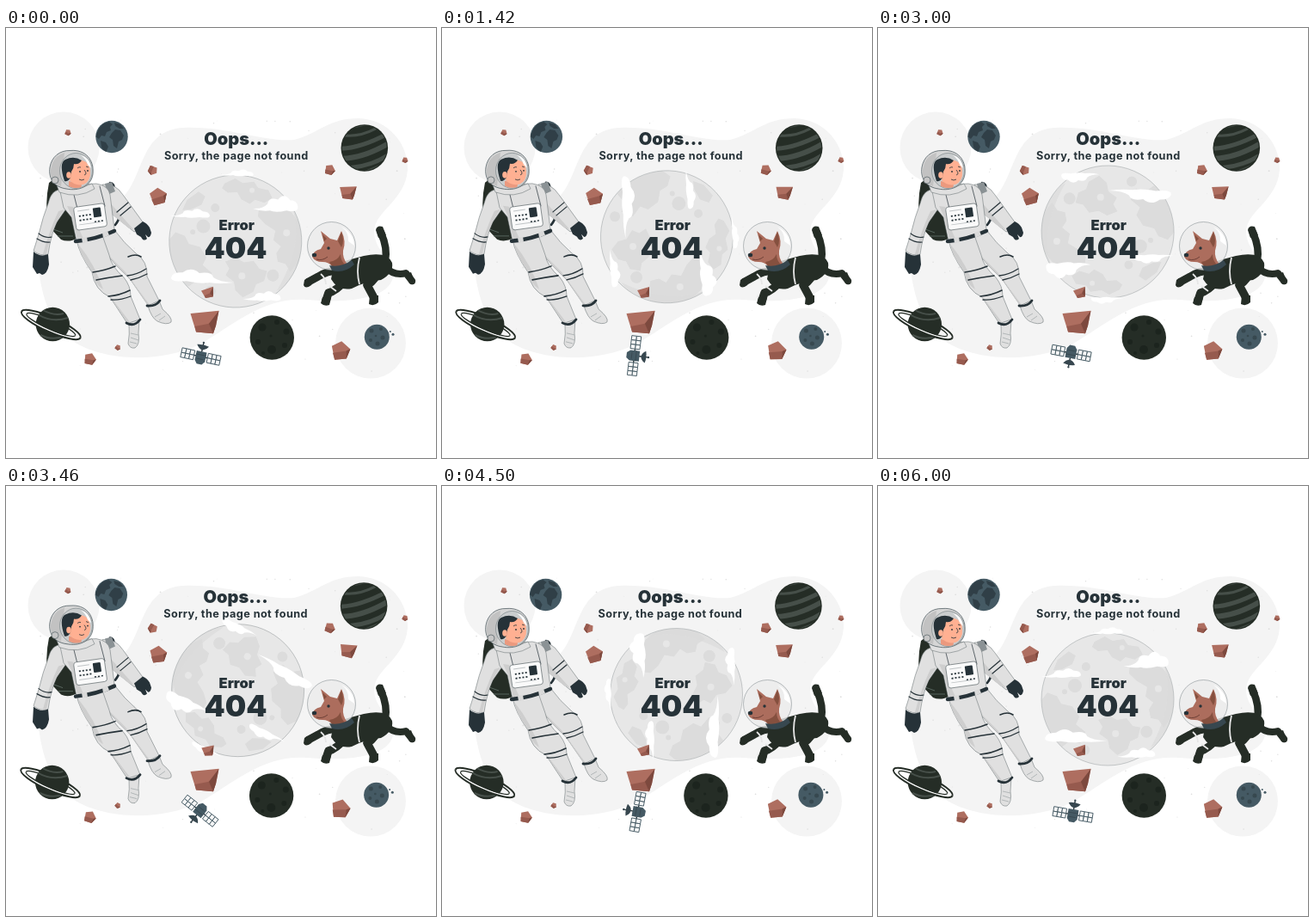
These frames come from a looping animation (500 px wide and 500 px high, 6.04 s). An HTML page:

```html
<!DOCTYPE html>
<html lang="en">
<head>
<meta charset="utf-8">
<title>Page not found</title>
<style>
html, body { margin: 0; width: 100%; height: 100%; overflow: hidden; background: #fff; }
svg { display: block; width: 100vw; height: 100vh; }
text { font-family: Inter, "Open Sans", sans-serif; fill: #263238; text-anchor: middle; }
.ink { fill: #263238; }
.dark { fill: #252d26; }
.suit { fill: #e0e0e0; stroke: #5d6669; stroke-width: .5; stroke-linejoin: round; }
.shade { fill: #cecece; }
.line { fill: none; stroke: #263238; stroke-linecap: round; stroke-linejoin: round; }
.dogline { fill: none; stroke: #252d26; stroke-linecap: round; stroke-linejoin: round; }
</style>
</head>
<body>
<svg viewBox="0 0 500 500">
  <defs>
    <clipPath id="moonClip"><circle cx="267" cy="248" r="76.6"/></clipPath>
    <clipPath id="stripeClip"><circle cx="416.8" cy="139.5" r="26"/></clipPath>
    <clipPath id="ringClip"><circle cx="54.3" cy="344.5" r="19.5"/></clipPath>
    <clipPath id="earthClip"><circle cx="123" cy="126.5" r="18.5"/></clipPath>
    <clipPath id="visorClip"><ellipse cx="81.500" cy="166" rx="18.500" ry="20"/></clipPath>
  </defs>

  <g fill="#f4f4f4">
    <path d="M36 258C34 210 90 222 126 204C162 186 150 120 205 116C255 113 300 133 335 130C365 122 375 105 410 105C445 106 468 135 467 165C464 202 428 212 428 238C430 262 452 270 450 290C444 316 395 320 350 316C300 312 265 345 225 368C180 390 110 388 75 362C45 338 38 295 36 258Z"/>
    <circle cx="67" cy="139" r="41.500"/>
    <circle cx="424" cy="366.500" r="41"/>
  </g>
  <g id="stars" fill="#dedede"></g>

  <g id="moon">
    <circle cx="267" cy="248" r="77" fill="#e7e7e7"/>
    <g clip-path="url(#moonClip)" fill="#dcdcdc">
      <path d="M252 181l12-6 9 5 13-2 5 7 12 2 5 9-9 6-11-3-6 5-10-5-5-8-11 1-7-5Z"/>
      <path d="M293 208l14 2 8-6 16 8 16 20-1 32-14 17-6-9-9-2-2-10 5-8-9-7 2-11-12-7-9-9Z"/>
      <path d="M189 250l8-10 11 4 5 9 13 3 8 12-4 9 11 9-6 13-12-3-9 7-17-14-9-21Z"/>
      <path d="M256 272l12-5 10 5 11-2 7 9 9 2-3 12-9 4-3 9-12 7-9-8-2-10-10-7 4-8Z"/>
      <path d="M209 202l13-10 8 5-4 10-12 6-10 1Z"/>
      <circle cx="229" cy="232" r="8"/><circle cx="217" cy="239" r="3"/><circle cx="242" cy="210" r="5"/>
      <circle cx="312" cy="286" r="7"/><circle cx="240" cy="307" r="6"/>
      <g fill="#e7e7e7"><circle cx="284" cy="188" r="3"/><circle cx="326" cy="236" r="4"/><circle cx="276" cy="288" r="4"/></g>
      <path d="M331 205Q348 248 317 304Q327 299 339 279Q352 239 331 205Z" opacity=".7"/>
    </g>
    <circle cx="267" cy="248" r="77" fill="none" stroke="#959b9d" stroke-width=".5"/>
    <g id="clouds" fill="#fff"></g>
  </g>

  <text x="268.300" y="235" font-size="16.500" font-weight="900">Error</text>
  <text x="267" y="267.800" font-size="34.500" font-weight="900">404</text>

  <g class="drift">
    <text x="267.800" y="135.500" font-size="20" font-weight="900">Oops...</text>
    <text x="267.800" y="153" font-size="12.700" font-weight="700" letter-spacing=".4">Sorry, the page not found</text>
  </g>

  <g class="drift">
    <circle cx="123" cy="126.500" r="18.700" fill="#455a64"/>
    <g clip-path="url(#earthClip)" fill="#263238" opacity=".65">
      <path d="M108 117l5-6 7-2 4 3-3 3 1 4-5 2-2 5-4-1-3 4-4-3ZM123 122l4-4 6 1 4 6-2 5-4 2-2 8-4-3-1-7-4-3ZM126 110l7 2 4 5-5 0-5-3ZM110 131l6 2 3 5-3 7-5-6Z"/>
    </g>

    <circle cx="416.800" cy="139.500" r="27.300" class="dark"/>
    <g clip-path="url(#stripeClip)" fill="none" stroke="#464f49" stroke-linecap="round">
      <g transform="rotate(-14 416.800 139.500)">
        <path d="M396 119Q414 126 434 121" stroke-width="3"/>
        <path d="M387 133Q411 139 447 130" stroke-width="5"/>
        <path d="M388 145Q412 151 446 141" stroke-width="6"/>
        <path d="M397 158Q421 162 445 153" stroke-width="5"/>
        <path d="M405 113L431 114M410 166L434 163" stroke-width="1.500"/>
      </g>
    </g>

    <circle cx="309.300" cy="360" r="25.700" class="dark"/>
    <g fill="#1c241e">
      <circle cx="298" cy="348" r="4.500"/><circle cx="315" cy="342" r="3"/><circle cx="326" cy="353" r="3.500"/>
      <circle cx="293" cy="365" r="3"/><circle cx="309" cy="374" r="5"/><circle cx="324" cy="369" r="3"/>
      <circle cx="308" cy="358" r="1.500"/><circle cx="299" cy="378" r="2"/>
    </g>

    <g transform="translate(52.300 345) rotate(24)" fill="none" stroke="#252d26">
      <path d="M-37.500 0A37.500 8.500 0 0 1 37.500 0" stroke-width="2"/>
      <path d="M-31 0A31 5.500 0 0 1 31 0" stroke-width="1.300"/>
    </g>
    <circle cx="54.300" cy="344.500" r="19.700" class="dark"/>
    <g clip-path="url(#ringClip)" fill="none" stroke="#464f49" stroke-width="2">
      <path d="M37 333Q53 343 72 337M43 328Q55 335 67 332M40 357Q54 364 70 358"/>
    </g>
    <g transform="translate(52.300 345) rotate(24)" fill="none">
      <path d="M-34 0A34 7 0 0 0 34 0" stroke="#fff" stroke-width="2.200"/>
      <path d="M-37.500 0A37.500 8.500 0 0 0 37.500 0" stroke="#252d26" stroke-width="2"/>
      <path d="M-31 0A31 5.500 0 0 0 31 0" stroke="#252d26" stroke-width="1.300"/>
    </g>

    <circle cx="431.300" cy="359.300" r="14.500" fill="#455a64"/>
    <g fill="#37484f">
      <circle cx="425" cy="352" r="2.500"/><circle cx="436" cy="350" r="2"/><circle cx="438" cy="360" r="2.500"/>
      <circle cx="424" cy="363" r="2"/><circle cx="432" cy="367" r="2.500"/><circle cx="430" cy="358" r="1.300"/>
    </g>
    <g fill="#455a64"><circle cx="446.800" cy="353" r="1"/><circle cx="450" cy="356.300" r="1.500"/></g>
  </g>

  <g id="rocks"></g>

  <g id="probe">
    <g transform="translate(226.500 382) rotate(10)">
      <path class="line" d="M-8 0H8M0 -6V-15" stroke-width="1.400"/>
      <g id="panels" fill="#f8f8f8" stroke="#455a64" stroke-width=".9"></g>
      <path d="M-6 -6H6V5L3 9H-3L-6 5Z" fill="#455a64"/>
      <path d="M-6 -2H6M-4 3H4" stroke="#37474f" stroke-width=".8"/>
      <path d="M-7 -13Q0 -15 7 -13Q4 -8 0 -8Q-4 -8 -7 -13Z" fill="#37474f"/>
      <circle cy="-16.500" r="1.200" fill="#37474f"/>
    </g>
  </g>

  <g id="astronaut">
    <path class="dark" d="M50 180Q60 171 76 176L84 244Q73 250 64 246L49 230Q45 203 50 180Z"/>
    <path d="M52 233L66 238M60 242L78 242" stroke="#56645d" fill="none"/>
    <path class="line" d="M121 180Q126 180 126 190L129 207Q136 218 127 229" stroke-width="2.600"/>
    <path class="suit" d="M112 182Q127 180 136 194L160 227Q159 236 149 237L118 212Z"/>
    <path class="shade" d="M119 201L148 234L143 233L119 213Z"/>
    <path d="M115 181L123 179L127 190L118 194Z" fill="#8b9295"/>
    <path class="line" d="M129 214L142 203M133 218L145 208" stroke-width="1.200"/>
    <path class="ink" d="M149 233L159 225Q164 227 167 232L169 238Q168 244 165 243L162 240L164 245Q160 249 157 243L152 240Z"/>

    <path class="suit" d="M106 240L127 236Q137 250 151 262Q165 271 164 289L178 317Q174 324 165 322L145 293L128 276L116 262Z"/>
    <path class="shade" d="M117 262L139 284L167 322L164 321L145 293L128 276Z"/>
    <path class="suit" d="M82 246L112 241L120 264Q122 277 137 290Q145 300 145 312L156 339Q149 347 140 342L121 313Q103 305 100 284Q85 263 82 246Z"/>
    <path class="shade" d="M84 251Q104 276 113 304Q103 298 100 283Q86 265 84 251ZM122 313L144 342L141 342L121 313Z"/>
    <path class="line" d="M101 284Q115 282 127 277M105 293Q120 290 135 288M119 312Q132 311 144 305M142 266Q151 262 157 266" stroke-width="1.600"/>
    <path class="line" d="M122 316Q132 317 145 312M141 288Q152 287 163 280M145 293Q155 291 164 286" stroke-width="1.300"/>
    <path class="suit" d="M143 343L155 339L154 355Q156 368 150 372Q144 373 142 367Q144 357 143 343Z"/>
    <path class="suit" d="M165 323L178 317L182 327Q194 337 192 342Q187 346 176 341Q169 337 165 323Z"/>
    <path class="line" d="M140 343Q149 348 156 339M164 323Q174 324 179 317" stroke-width="2.800"/>
    <path d="M144 365L152 367M145 360L154 363M145 355L154 357M173 336L180 332M178 340L185 335" stroke="#a6acae" stroke-width=".8"/>

    <path class="suit" d="M67 188Q53 186 49 204Q43 219 38 240L32 259Q40 266 49 263Q52 241 59 226L73 206Z"/>
    <path class="shade" d="M68 211Q53 231 47 263L43 263Q50 236 61 213Z"/>
    <path class="line" d="M38 239Q46 245 53 243M36 245Q44 250 51 249" stroke-width="1.200"/>
    <path class="ink" d="M32 260Q40 267 49 263L50 275Q48 286 42 287L39 285L36 286L31 278Z"/>

    <path class="suit" d="M63 190Q82 181 105 181Q119 183 121 194L126 234Q105 247 82 248L76 220L67 209Z"/>
    <path class="shade" d="M71 207L77 220L83 246L90 245Q81 227 78 208Z"/>
    <path class="line" d="M81 248Q104 246 126 236" stroke-width="4.500"/>
    <path d="M88 244L94 243L95 249L89 250ZM112 238L118 236L120 241L113 244Z" fill="#d9d9d9"/>
    <path class="line" d="M78 190L85 218M109 184L115 207" stroke-width=".7"/>

    <g transform="translate(98 219) rotate(-8)">
      <rect x="-18" y="-13" width="36" height="27" rx="3" fill="#fafafa" stroke="#4b5659" stroke-width=".6"/>
      <rect x="4" y="-9" width="9" height="11" rx="1" class="ink"/>
      <path d="M-14 -8H0M-14 8H11" stroke="#c0c4c6"/>
      <path d="M-13 -2H1M-13 3H1" stroke="#263238" stroke-width="1.800" stroke-dasharray="2 2"/>
      <path d="M4 7H14" stroke="#263238" stroke-width="1.500" stroke-dasharray="2 2"/>
    </g>

    <path class="suit" d="M59 183Q76 192 100 181L103 187Q84 199 62 191Z"/>
    <path d="M75 142.500C92 141 103 153 101 170C99 184 85 190 70 187C56 185 49 175 51 162C53 150 62 142 75 142.500Z" fill="#d6d6d6" stroke="#435157" stroke-width=".7"/>
    <path d="M54 157Q58 148 68 145L64 184Q51 180 52 165Z" fill="#c2c2c2"/>
    <ellipse cx="81.500" cy="166" rx="19" ry="20.500" fill="#c9cccd" stroke="#7f888b" stroke-width=".7"/>
    <g clip-path="url(#visorClip)">
      <path d="M73 178L88 181L87 190H73Z" fill="#eb997e"/>
      <path d="M73 160Q79 152 89 154Q97 156 98 166Q99 178 90 182Q80 184 74 177Z" fill="#ffb092"/>
      <path class="ink" d="M68 178Q61 157 69 153Q79 148 88 154Q85 159 79 158Q79 163 76 167L75 174Q72 179 68 178Z"/>
      <ellipse cx="73" cy="171" rx="2.800" ry="3.800" fill="#ffb092"/>
      <path d="M83 163Q85 161 87 162M93 161L96 162M91 165Q95 170 91 171M85 176Q88 178 91 176" fill="none" stroke="#263238" stroke-width=".8"/>
      <circle cx="86" cy="167" r=".9" class="ink"/><circle cx="95" cy="166" r=".9" class="ink"/>
    </g>
    <path d="M87 148Q97 150 99 163L95 159Q93 152 87 148Z" fill="#fff"/>
    <circle cx="57" cy="177" r="4" fill="#c6c6c6" stroke="#435157" stroke-width=".6"/>
  </g>

  <g id="dog">
    <path class="dogline" d="M441 271Q444 256 436 238" stroke-width="8.500"/>
    <path class="dark" d="M430 235Q431 229 438 231L442 241L433 244Z"/>
    <path class="dogline" d="M439 277Q452 289 465 285L472 294" stroke-width="8"/>
    <path class="dogline" d="M433 281Q430 293 420 299L428 314" stroke-width="9.500"/>
    <path class="dark" d="M423 311L433 311L433 319Q428 324 422 321ZM465 286L471 284L476 296Q474 300 469 297Z"/>
    <path class="dogline" d="M394 283Q377 280 363 289L352 295" stroke-width="9"/>
    <path class="dogline" d="M396 292Q384 306 375 308L372 317" stroke-width="9.500"/>
    <path class="dark" d="M347 293Q351 289 358 292L355 299Q348 304 346 299ZM368 313L378 314L376 322Q370 324 366 320Z"/>
    <path class="dark" d="M381 276Q398 269 416 265Q443 259 449 273Q451 285 436 293Q419 294 402 303Q386 306 378 292Z"/>
    <path d="M411 267Q407 283 411 298M366 286Q372 291 372 298M376 300L384 306" fill="none" stroke="#e6e6e6" stroke-width="1.800"/>
    <circle cx="378.500" cy="253.500" r="28" fill="#ececec" fill-opacity=".8" stroke="#8a9295" stroke-width=".6"/>
    <path d="M370 250L366 236L377 245L385 247L390 236Q396 248 392 259Q391 267 397 275Q388 283 379 277Q375 272 368 272Q359 272 356 266Q357 259 366 257Z" fill="#ac6d5d"/>
    <path d="M386 248L390 237Q394 248 390 255ZM376 272Q385 271 389 263Q389 271 395 276Q386 281 379 277Z" fill="#85503f"/>
    <path d="M368 240L373 245L370 248Z" fill="#85503f"/>
    <ellipse cx="358.500" cy="264" rx="2.700" ry="2.200" class="ink"/>
    <circle cx="375" cy="256" r="1.700" class="ink"/>
    <path d="M361 269Q368 271 374 266" fill="none" stroke="#60372f" stroke-width=".8"/>
    <path d="M376 276Q389 279 402 270L405 275Q393 286 379 282Z" fill="#37474f"/>
    <path d="M390 231Q404 238 405 253L398 248Q399 238 390 231Z" fill="#fff"/>
  </g>
</svg>
<script>
const LOOP = 6040;
const $ = id => document.getElementById(id);
const fill = (id, parts) => { $(id).innerHTML = parts.join(''); };

// Faint stars
let seed = 17;
const rand = () => (seed = (seed * 16807) % 2147483647) / 2147483647;
fill('stars', Array.from({ length: 100 }, () => {
  const x = 40 + rand() * 430, y = 105 + rand() * 295, r = .35 + rand() * .55;
  return `<circle cx="${x}" cy="${y}" r="${r}"/>`;
}));

// Clouds: centre, width, height, mirrored
const clouds = [
  [213, 217, 46, 12, 1], [266, 168, 38, 9, 1], [312, 202, 52, 21, 1],
  [230, 290, 72, 17, -1], [300, 310, 44, 13, 1]
];
fill('clouds', clouds.map(([x, y, w, h, flip]) =>
  `<path transform="translate(${x} ${y}) scale(${w * flip / 100} ${h / 100})"
    d="M-50 35Q-28 35-18 5Q-15-35 5-20Q18-65 32-20Q48-20 50 15Q52 50 25 38Q0 55-12 42Q-30 50-50 35Z"/>`));

// Solar panels, three by two cells
const cells = [];
for (const side of [-23, 8])
  for (let i = 0; i < 6; i++)
    cells.push(`<rect x="${side + i % 3 * 5}" y="${i < 3 ? -5.5 : 0}" width="5" height="5.5"/>`);
fill('panels', cells);

// Rocks: centre, radius, form, resting angle
const forms = {
  lump: ['-9,-5 1,-10 10,-2 6,8 -6,9', '-8,2 6,0 10,-2 6,8 -6,9', '6,0 10,-2 6,8'],
  bowl: ['-10,-6 10,-8 8,2 6,8 -6,7', '-7,3 3,1 8,2 6,8 -6,7', '3,1 10,-8 8,2 6,8']
};
const rocks = [
  [72, 121.5, 3.7, 'lump', 30], [170.5, 165.5, 5.7, 'lump', 120], [177, 196, 10.3, 'lump', -10],
  [397.5, 191.5, 9.7, 'bowl', 3], [376.5, 165, 6.3, 'lump', 20], [464, 153.5, 3.5, 'lump', 30],
  [235, 308, 7.2, 'bowl', -14], [231, 342, 16.5, 'bowl', 0], [97.5, 385, 7.2, 'lump', 15],
  [130, 371.5, 3.4, 'lump', 45], [389, 375.5, 11.3, 'lump', 0]
];
const tones = ['#ae6e60', '#965a4e', '#7d493e'];
fill('rocks', rocks.map(([, , , form]) =>
  '<g>' + forms[form].map((p, i) => `<polygon points="${p}" fill="${tones[i]}"/>`).join('') + '</g>'));
const rockNodes = [...$('rocks').children];
const drifting = [...document.querySelectorAll('.drift')];

// Sideways drift: time, offset
const drift = [
  [0, 0], [600, -.3], [1000, -1.5], [1420, -1.6], [1920, -1.4], [2250, -.6], [2700, 0], [3000, 0],
  [3400, -.6], [3880, -2.3], [4500, -2.4], [5200, -2], [5670, -.4], [6000, 0], [LOOP, 0]
];
const smooth = k => k * k * (3 - 2 * k);
function track(keys, t) {
  const i = keys.findIndex(k => k[0] > t);
  const [t0, a] = keys[i - 1], [t1, b] = keys[i];
  return a + (b - a) * smooth((t - t0) / (t1 - t0));
}
const place = (node, value) => node.setAttribute('transform', value);

function draw(now) {
  const t = now % LOOP;
  const turn = (t + 35) / LOOP * 360;
  place($('moon'), `rotate(${turn} 267 242.5)`);
  place($('probe'), `rotate(${turn} 225.5 380)`);

  const dx = track(drift, t);
  drifting.forEach(n => place(n, `translate(${dx} 0)`));

  const swing = Math.sin(Math.PI * (t % 1500) / 1500);
  place($('astronaut'), `translate(0 ${-5 * swing * swing})`);

  const rock = Math.sqrt(swing);
  rocks.forEach(([x, y, r, , a], i) => {
    const tilt = r > 13 ? 0 : 8 * rock;
    place(rockNodes[i], `translate(${x} ${y}) rotate(${a + tilt}) scale(${r / 10})`);
  });

  // One short swell per beat, peaking 250 ms in
  const beat = (t % (6000 / 9) - 250) / 85;
  const grow = Math.abs(beat) < 1 ? Math.cos(Math.PI / 2 * beat) ** 2 : 0;
  place($('dog'), `translate(411 277) scale(${1 + .075 * grow}) translate(-411 -277)`);
}

function tick(now) {
  draw(now);
  requestAnimationFrame(tick);
}
draw(0);
requestAnimationFrame(tick);
</script>
</body>
</html>
```
